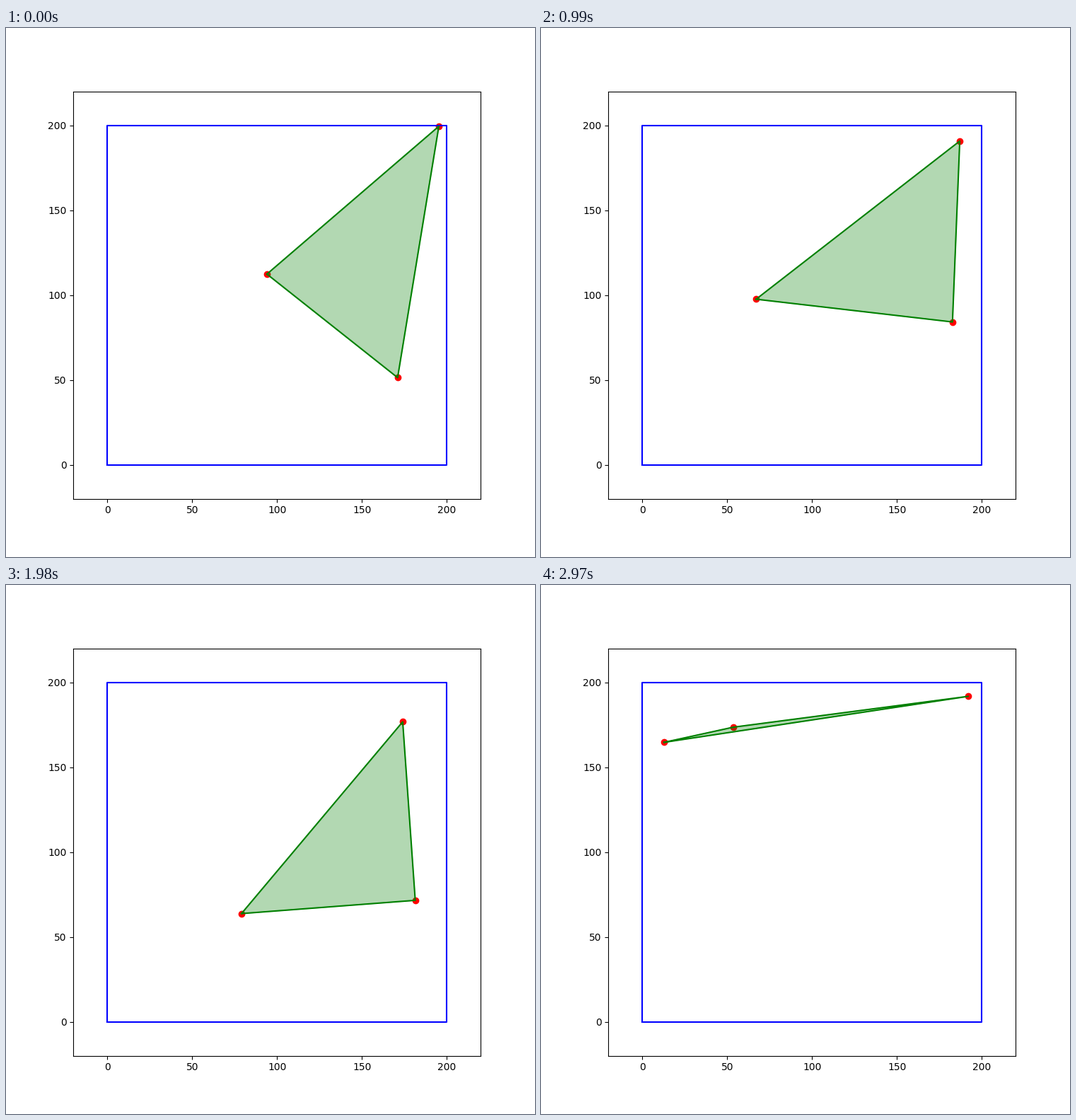
Write a matplotlib script that moves like this. It is 748 by 748 pixels and loops after 3300 ms.

```python
import matplotlib.pyplot as plt
from matplotlib.animation import FuncAnimation

SIDE = 200
MARGIN = 20
STEP_MS = 330

# Three sampled points inside the square for each step
TRIANGLES = [
    [(94.0, 112.4), (195.3, 199.5), (171.0, 51.4)],
    [(72.0, 162.2), (175.7, 188.7), (129.0, 118.7)],
    [(5.4, 120.0), (195.3, 140.0), (107.0, 58.6)],
    [(67.0, 97.6), (187.0, 190.8), (182.7, 84.2)],
    [(55.7, 30.9), (182.3, 162.0), (113.4, 17.9)],
    [(77.0, 115.0), (150.0, 145.0), (135.0, 80.0)],
    [(79.0, 63.8), (174.0, 176.8), (181.4, 71.6)],
    [(193.2, 100.0), (135.0, 18.7), (103.0, 135.0)],
    [(37.3, 171.6), (170.2, 110.5), (99.3, 1.7)],
    [(12.8, 164.7), (192.0, 191.8), (53.4, 173.6)],
]


def closed(points):
    """Return x and y sequences of the closed outline."""
    return zip(*points, points[0])


fig, ax = plt.subplots(figsize=(7.48, 7.48), dpi=100)
ax.set_aspect("equal")
ax.set_xlim(-MARGIN, SIDE + MARGIN)
ax.set_ylim(-MARGIN, SIDE + MARGIN)
ticks = range(0, SIDE + 1, 50)
ax.set_xticks(ticks)
ax.set_yticks(ticks)

square = [(0, 0), (SIDE, 0), (SIDE, SIDE), (0, SIDE)]
ax.plot(*closed(square), color="blue")

start = TRIANGLES[0]
dots = ax.scatter(*zip(*start), color="red")
(area,) = ax.fill(*zip(*start), color="green", alpha=0.3)
(outline,) = ax.plot(*closed(start), color="green")


def update(step):
    points = TRIANGLES[step]
    dots.set_offsets(points)
    area.set_xy(points)
    outline.set_data(*closed(points))
    return dots, area, outline


animation = FuncAnimation(fig, update, frames=len(TRIANGLES),
                          interval=STEP_MS, repeat=True, repeat_delay=0)
plt.show()
```
